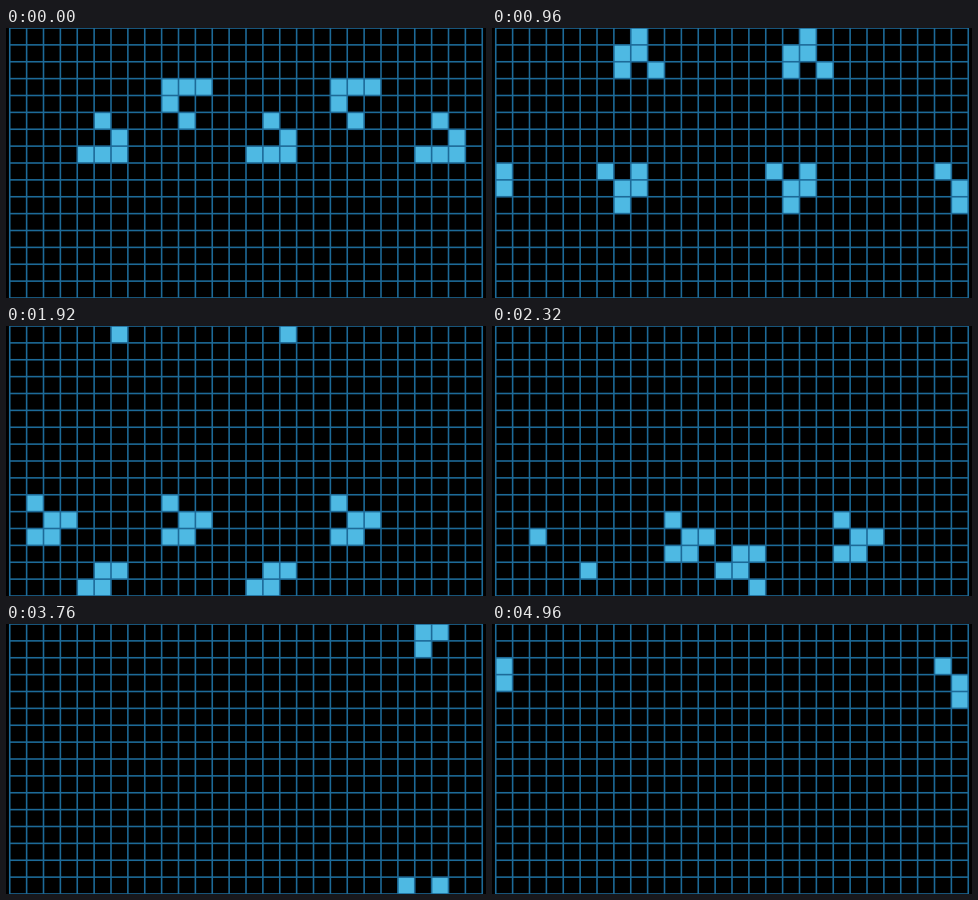
Write a matplotlib script that moves like this. It is 480 px wide and 270 px high and loops after 5.04 s.

```python
import numpy as np
import matplotlib.pyplot as plt
from matplotlib.animation import FuncAnimation
from matplotlib.colors import ListedColormap

W, H = 480, 270
ROWS, COLS = 16, 28
CELL = H / ROWS
LEFT = (W - COLS * CELL) / 2
FRAMES, INTERVAL = 63, 80
LINE, ALIVE = "#1d6a98", "#4eb9e3"

GLIDER = np.array([[0, 1, 0],
                   [0, 0, 1],
                   [1, 1, 1]])


def start_grid():
    grid = np.zeros((ROWS, COLS), int)
    for col in (4, 14, 24):      # heading down and right
        grid[5:8, col:col + 3] = GLIDER
    for col in (9, 19):          # heading up and left
        grid[3:6, col:col + 3] = GLIDER[::-1, ::-1]
    return grid


def evolve(grid):
    """One Game of Life generation on a torus."""
    near = sum(np.roll(grid, (dy, dx), (0, 1))
               for dy in (-1, 0, 1) for dx in (-1, 0, 1)) - grid
    return ((near == 3) | ((grid == 1) & (near == 2))).astype(int)


def generation(frame):
    """A generation lasts 100 ms, rounded to the nearest frame."""
    return (4 * frame + 1) // 5


history = [start_grid()]
while len(history) <= generation(FRAMES - 1):
    history.append(evolve(history[-1]))

fig = plt.figure(figsize=(W / 72, H / 72), dpi=72, facecolor="black")
ax = fig.add_axes([0, 0, 1, 1])
ax.set_xlim(0, W)
ax.set_ylim(H, 0)
ax.axis("off")

xs = LEFT + CELL * np.arange(COLS + 1)
ys = CELL * np.arange(ROWS + 1)
mesh = ax.pcolormesh(xs, ys, history[0], vmin=0, vmax=1,
                     cmap=ListedColormap(["black", ALIVE]))
style = dict(colors=LINE, linewidths=1.6, zorder=3, snap=False)
ax.vlines(xs, 0, H, **style)
ax.hlines(ys, xs[0], xs[-1], **style)
ax.set_xlim(0, W)
ax.set_ylim(H, 0)


def draw(frame):
    mesh.set_array(history[generation(frame)])
    return [mesh]


anim = FuncAnimation(fig, draw, frames=FRAMES, interval=INTERVAL,
                     repeat=True, repeat_delay=0, blit=False)
plt.show()
```
